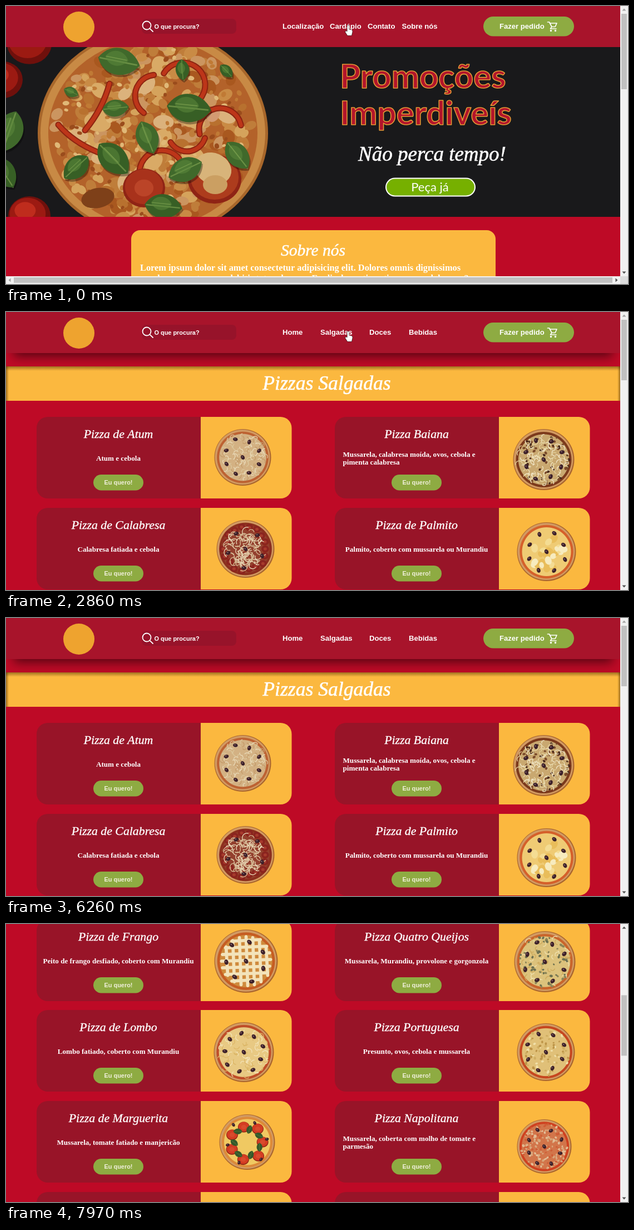
These frames come from a looping animation (1118 px wide and 501 px high, 8000 ms). An HTML page with a canvas:

```html
<!DOCTYPE html>
<html lang="pt">
<head>
<meta charset="utf-8">
<title>Pizzaria</title>
<style>
html, body { margin: 0; width: 100%; height: 100%; overflow: hidden; background: #be0a26; }
canvas { display: block; }
</style>
</head>
<body>
<canvas id="stage" width="1118" height="501"></canvas>
<script>
const ctx = document.getElementById('stage').getContext('2d');
const W = 1118, H = 501, PAGE = 1104, LOOP = 8000, TAU = Math.PI * 2;
const RED = '#be0a26', HEADER = '#a8142b', WINE = '#981428', GOLD = '#fbb83f', GREEN = '#8eab42';
const SANS = '"Liberation Sans", Arial, sans-serif';
const SERIF = '"Liberation Serif", "Times New Roman", serif';
const BODY = `bold 13.1px ${SERIF}`, NAV = `bold 13.1px ${SANS}`, SMALL = `bold 10.9px ${SANS}`;

// Basic drawing helpers
function text(str, x, y, font, color = '#fff', align = 'left') {
  ctx.font = font;
  ctx.fillStyle = color;
  ctx.textAlign = align;
  ctx.fillText(str, x, y);
}
// Centred italic lettering, slightly thickened
function script(str, x, y, size) {
  text(str, x, y, `italic ${size}px ${SERIF}`, '#fff', 'center');
  ctx.strokeStyle = '#fff';
  ctx.lineWidth = size / 60;
  ctx.strokeText(str, x, y);
}
function rect(x, y, w, h, color) {
  ctx.fillStyle = color;
  ctx.fillRect(x, y, w, h);
}
function rounded(x, y, w, h, r, color) {
  ctx.beginPath();
  ctx.roundRect(x, y, w, h, r);
  ctx.fillStyle = color;
  ctx.fill();
}
function oval(g, x, y, rx, ry, color, turn = 0) {
  g.beginPath();
  g.ellipse(x, y, rx, ry, turn, 0, TAU);
  g.fillStyle = color;
  g.fill();
}
function line(g, color, width, draw) {
  g.beginPath();
  draw(g);
  g.strokeStyle = color;
  g.lineWidth = width;
  g.lineCap = g.lineJoin = 'round';
  g.stroke();
}
function fade(x0, y0, x1, y1, from, to) {
  const f = ctx.createLinearGradient(x0, y0, x1, y1);
  f.addColorStop(0, from);
  f.addColorStop(1, to);
  return f;
}
function random(seed) {
  return () => (seed = seed * 16807 % 2147483647) / 2147483647;
}
function sheet(w, h, scale, draw) {
  const c = document.createElement('canvas');
  c.width = w * scale;
  c.height = h * scale;
  const g = c.getContext('2d');
  g.scale(scale, scale);
  draw(g);
  return c;
}

// Toppings
const bits = {
  dot: (g, x, y, s, c, a) => oval(g, x, y, s, s * .75, c, a),
  shred: (g, x, y, s, c, a) => line(g, c, 1.3, p => p.arc(x, y, s, a, a + 2.2)),
  olive(g, x, y, s, c, a) {
    oval(g, x, y, s, s * .75, c, a);
    oval(g, x - s * .2, y - s * .2, s * .3, s * .2, '#8a6a70', a);
  },
  slice(g, x, y, s, c) {
    oval(g, x, y, s, s * .92, '#8f2415');
    oval(g, x, y - s * .06, s * .9, s * .83, c);
    oval(g, x, y, s * .45, s * .4, '#e0694455');
  },
  leaf(g, x, y, s, c, a) {
    g.save();
    g.translate(x, y);
    g.rotate(a);
    g.beginPath();
    g.moveTo(-s, 0);
    g.bezierCurveTo(-s * .5, -s * .95, s * .6, -s * .75, s, 0);
    g.bezierCurveTo(s * .5, s * .85, -s * .6, s * .85, -s, 0);
    g.fillStyle = c;
    g.fill();
    line(g, '#8fb05a88', s * .07, p => { p.moveTo(-s * .9, 0); p.lineTo(s * .85, 0); });
    g.restore();
  }
};
const scatter = (kind, n, size, spread, ...cols) => (g, r, rnd) => {
  for (let i = 0; i < n; i++) {
    const a = rnd() * TAU, d = Math.sqrt(rnd()) * spread * r;
    bits[kind](g, Math.cos(a) * d, Math.sin(a) * d, size * r * (.7 + rnd() * .6),
      cols[Math.floor(rnd() * cols.length)], rnd() * TAU);
  }
};
const ring = (kind, n, size, at, color, phase = 0) => (g, r, rnd) => {
  for (let i = 0; i < n; i++) {
    const a = i / n * TAU + phase, d = at * r * (.92 + rnd() * .16);
    bits[kind](g, Math.cos(a) * d, Math.sin(a) * d, size * r, color, rnd() * TAU);
  }
};
const lattice = color => (g, r) => {
  for (let i = -3; i <= 3; i++) {
    const p = i * .21 * r, q = Math.sqrt(.6 * r * r - p * p);
    line(g, color, r * .1, c => {
      c.moveTo(-q, p); c.lineTo(q, p - 3);
      c.moveTo(p, -q); c.lineTo(p + 3, q);
    });
  }
};
const OLIVE = '#3c2029', CHOCO = '#4c281c';
const olives = n => (g, r, rnd) => {
  ring('olive', n, .085, .64, OLIVE, .4)(g, r, rnd);
  bits.olive(g, 0, 0, r * .085, OLIVE, 1);
};
const swirls = scatter('shred', 45, .13, .78, '#6d3f2c', '#5c3224', '#3b1d14');

let seed = 11;
function pizza(dx, dy, r, sauce, base, ...tops) {
  const rnd = random(seed += 97);
  const img = sheet(2 * r + 4, 2 * r + 4, 2, g => {
    g.translate(r + 2, r + 2);
    oval(g, 0, 0, r, r, '#a9662f');
    oval(g, -.5, -.5, r * .97, r * .97, '#d29a62');
    oval(g, 0, 0, r * .91, r * .91, sauce);
    oval(g, 0, 0, r * .83, r * .83, base);
    tops.forEach(top => top(g, r, rnd));
  });
  return { dx, dy, r, img };
}
const cheese = (n, ...cols) => scatter('shred', n, .09, .82, ...cols);
const specks = (n, ...cols) => scatter('dot', n, .045, .84, ...cols);
const choco = (dx, dy, r, ...tops) => pizza(dx, dy, r, CHOCO, CHOCO, ...tops);
const item = (name, desc, pic) => ({ name: 'Pizza ' + name, desc: desc.split('|'), pic });

const salty = [
  [item('de Atum', 'Atum e cebola',
    pizza(76, 73, 51, '#bd6232', '#d3b183', cheese(110, '#e9dab8', '#dcc79c', '#c39a69'), olives(8))),
   item('Baiana', 'Mussarela, calabresa moída, ovos, cebola e|pimenta calabresa',
    pizza(81, 77, 55, '#7c3a1c', '#c9a870', specks(60, '#4a2a1c', '#7a4a2a'), cheese(110, '#f1e6c6', '#e4d3a0'), olives(8)))],
  [item('de Calabresa', 'Calabresa fatiada e cebola',
    pizza(81, 74, 52, '#8c2f1e', '#93402e', ring('slice', 18, .13, .74, '#8a2420'),
      scatter('shred', 110, .13, .64, '#e9d9b8', '#d8bd97'), olives(5))),
   item('de Palmito', 'Palmito, coberto com mussarela ou Murandiu',
    pizza(86, 79, 53, '#d5602a', '#efcb74', scatter('dot', 26, .13, .65, '#f7ebbe', '#f4dc93', '#e9bd5a'), olives(8)))],
  [item('de Frango', 'Peito de frango desfiado, coberto com Murandiu',
    pizza(82, 75, 57, '#c65d22', '#cf8a3c', lattice('#f3e3ba'), olives(7))),
   item('Quatro Queijos', 'Mussarela, Murandiu, provolone e gorgonzola',
    pizza(83, 76, 55, '#c9652b', '#dcc27c', cheese(60, '#f0e2b0', '#cda85a'), specks(60, '#6c7050', '#8b8558'), olives(8)))],
  [item('de Lombo', 'Lombo fatiado, coberto com Murandiu',
    pizza(78, 76, 54, '#bf4d28', '#e8c983', cheese(80, '#f3e3b6', '#dcb666'), olives(9))),
   item('Portuguesa', 'Presunto, ovos, cebola e mussarela',
    pizza(85, 76, 52, '#c6471f', '#e0c078', specks(90, '#f0dfa8', '#bd9448', '#cfae62'), olives(8)))],
  [item('de Marguerita', 'Mussarela, tomate fatiado e manjericão',
    pizza(84, 74, 50, '#dd8a38', '#f0c962', ring('slice', 7, .21, .6, '#d43c22'), ring('leaf', 7, .16, .5, '#35592a', .4),
      ring('olive', 6, .07, .77, OLIVE, .9))),
   item('Napolitana', 'Mussarela, coberta com molho de tomate e|parmesão',
    pizza(82, 82, 49, '#cf401f', '#d2754a', specks(170, '#e3bd96', '#d9a67a', '#cf5d35'), olives(8)))],
  [item('de Pepperoni', 'Mussarela, coberta com pepperoni fatiado',
    pizza(85, 72, 50, '#c25a2c', '#d98344', ring('slice', 15, .14, .74, '#b9291c'), ring('slice', 10, .14, .47, '#c4301f'),
      ring('slice', 5, .14, .2, '#b9291c'))),
   item('de Brócolis', 'Brócolis com Murandiu',
    pizza(82, 79, 50, '#c99a50', '#d3c286', specks(65, '#6c8a3c', '#557231'), lattice('#eee3c0'), specks(35, '#6c8a3c'), olives(7)))]
];
const sweet = [
  [item('de Bruvela', 'Atum e cebola', choco(83, 77, 50, swirls)),
   item('de Morango e Bruvela', 'Peito de frango desfiado, coberto com Murandiu',
    choco(82, 76, 45, swirls, ring('leaf', 8, .13, .64, '#c9242c'), ring('leaf', 3, .12, .13, '#e56a5c')))],
  [item('de KV e Bruvela', 'Calabresa fatiada e cebola',
    choco(83, 75, 50, swirls, scatter('dot', 140, .042, .84, '#e2331f', '#f4c21c', '#2f8fd0', '#45a83a', '#ef7d1c'))),
   item('de Brigadeiro', 'Lombo fatiado, coberto com Murandiu',
    choco(82, 76, 49, scatter('dot', 420, .025, .88, '#2e170f', '#64402c', '#3b2016')))]
];

// Home banner
const TOP = 74;
const LEAVES = [
  [203, 100, 38, .2], [317, 115, 19, 1.5], [197, 184, 24, -.1], [329, 184, 40, .1],
  [254, 237, 31, 1.2], [193, 275, 37, .8], [416, 269, 30, .9], [126, 291, 29, 2.4],
  [322, 295, 33, 2.7], [283, 361, 34, .1], [117, 155, 14, .4], [396, 117, 15, .8], [6, 226, 38, 1.9], [-4, 300, 32, 1]
];
function tomato(g, x, y, r) {
  oval(g, x, y, r, r * .92, '#6f100c');
  oval(g, x - r * .08, y - r * .1, r * .85, r * .75, '#9c1a12');
  oval(g, x - r * .2, y - r * .25, r * .5, r * .4, '#bf2c1d');
}
function pepper(g, draw) {
  line(g, '#8c2411', 11, draw);
  line(g, '#bd3519', 7, draw);
}
const banner = sheet(PAGE, 306, 1, g => {
  g.translate(0, -TOP);
  g.fillStyle = '#19191b';
  g.fillRect(0, TOP, PAGE, 306);
  tomato(g, 42, 68, 40);
  tomato(g, -6, 133, 36);
  tomato(g, 42, 378, 38);
  oval(g, 264, 229, 207, 188, '#a8672b');
  oval(g, 264, 229, 202, 183, '#c88a45');
  oval(g, 264, 229, 188, 170, '#b3622a');
  g.save();
  g.translate(264, 229);
  g.scale(1, .91);
  const rnd = random(2024);
  scatter('dot', 330, .06, .93, '#c98b45', '#b8712f', '#d5a35c', '#a9581f', '#cb9560', '#bf7d3a')(g, 190, rnd);
  scatter('dot', 22, .1, .75, '#dbb27c', '#d39a72', '#d9aa66')(g, 190, rnd);
  scatter('dot', 160, .025, .92, '#e0b877', '#9a4c1c', '#c07a35')(g, 190, rnd);
  g.restore();
  pepper(g, p => p.arc(318, 142, 40, -2.6, .8));
  pepper(g, p => p.arc(270, 162, 38, 2.2, 4.6));
  pepper(g, p => p.arc(385, 222, 38, 2.9, 6.1));
  pepper(g, p => p.arc(325, 228, 34, .3, 2.6));
  pepper(g, p => p.arc(280, 300, 40, 3, 5.6));
  pepper(g, p => { p.moveTo(186, 140); p.quadraticCurveTo(174, 185, 142, 224); });
  pepper(g, p => { p.moveTo(94, 214); p.quadraticCurveTo(120, 245, 166, 264); });
  bits.slice(g, 248, 328, 38, '#a8321b');
  bits.slice(g, 375, 312, 48, '#ad3c1d');
  oval(g, 372, 293, 34, 28, '#d8b47a', .4);
  oval(g, 376, 322, 22, 17, '#cb9f62');
  oval(g, 165, 346, 30, 18, '#7e4019', -.2);
  LEAVES.forEach(([x, y, s, a], i) => {
    bits.leaf(g, x + 2, y + 4, s, '#00000055', a);
    bits.leaf(g, x, y, s, i % 2 ? '#375f25' : '#40692b', a);
    bits.leaf(g, x - s * .1, y - s * .15, s * .55, '#5d8a3c88', a);
  });
});

// Page parts
function header(links) {
  ctx.save();
  ctx.shadowColor = 'rgba(0,0,0,.55)';
  ctx.shadowBlur = 18;
  ctx.shadowOffsetY = 10;
  rect(14, 0, PAGE - 28, 70, HEADER);
  ctx.restore();
  rect(0, 0, PAGE, TOP, HEADER);
  oval(ctx, 131, 38, 28, 28, '#eea32f');
  rounded(244, 23, 170, 27, 8, '#97132a');
  line(ctx, '#fff', 1.8, p => {
    p.arc(253, 35, 7.5, .8, .8 + TAU);
    p.lineTo(264, 46);
  });
  text('O que procura?', 266.5, 41, SMALL);
  links.forEach(([label, x]) => text(label, x, 41, NAV));
  rounded(858, 19, 163, 35.5, 18, GREEN);
  text('Fazer pedido', 887, 41, NAV);
  line(ctx, '#fff', 1.7, p => {
    p.moveTo(973.5, 29); p.lineTo(976.5, 29); p.lineTo(981, 37.5); p.lineTo(987, 37.5); p.lineTo(990, 31); p.lineTo(978, 31);
    p.moveTo(981, 37.5); p.lineTo(978.5, 41); p.lineTo(989, 41);
  });
  oval(ctx, 979.5, 44.5, 1.7, 1.7, '#fff');
  oval(ctx, 987.5, 44.5, 1.7, 1.7, '#fff');
}

function band(label, center, y) {
  rect(0, y, PAGE, 62, GOLD);
  const dark = 'rgba(70,40,0,.5)', clear = 'rgba(70,40,0,0)';
  rect(0, y, PAGE, 8, fade(0, y, 0, y + 8, dark, clear));
  rect(0, y, 5, 62, fade(0, 0, 5, 0, dark, clear));
  rect(PAGE - 5, y, 5, 62, fade(PAGE, 0, PAGE - 5, 0, dark, clear));
  script(label, center, y + 42, 35.6);
}

function card({ name, desc, pic }, x, top) {
  if (top > H || top < -150) return;
  const y = Math.round(top), h = Math.round(top + 147.3) - y;
  rounded(x, y, 295, h, [20, 0, 0, 20], WINE);
  rounded(x + 295, y, 163.5, h, [0, 20, 20, 0], GOLD);
  const mid = x + 147;
  script(name, mid, y + 38, 21.8);
  if (desc.length > 1) desc.forEach((row, i) => text(row, x + 14.5, y + 71.5 + i * 14.6, BODY));
  else text(desc[0], mid, y + 79, BODY, '#fff', 'center');
  rounded(mid - 45, y + 104, 90, 28.5, 14.25, GREEN);
  text('Eu quero!', mid, y + 122, SMALL, '#f1f0dc', 'center');
  const { dx, dy, r, img } = pic;
  ctx.drawImage(img, x + 294.5 + dx - r - 2, y + dy - r - 2, 2 * r + 4, 2 * r + 4);
}

function arrow(x, y, dx, dy, color) {
  ctx.beginPath();
  ctx.moveTo(x + dx * 2.5, y + dy * 2.5);
  ctx.lineTo(x - dx * 1.5 + dy * 3.5, y - dy * 1.5 + dx * 3.5);
  ctx.lineTo(x - dx * 1.5 - dy * 3.5, y - dy * 1.5 - dx * 3.5);
  ctx.fillStyle = color;
  ctx.fill();
}
function scrollbar(bottom, top, size) {
  rect(PAGE, 0, 14, bottom, '#f1f1f1');
  rect(PAGE + 2, top, 10, size, '#c1c1c1');
  arrow(1111, 7, 0, -1, top > 14 ? '#505050' : '#a3a3a3');
  arrow(1111, bottom - 7, 0, 1, '#505050');
}

function home() {
  rect(0, 0, W, H, RED);
  header([['Localização', 497], ['Cardápio', 582], ['Contato', 650], ['Sobre nós', 711.5]]);
  ctx.drawImage(banner, 0, TOP);
  const big = 'bold 60px Lato, sans-serif';
  [['Promoções', 148], ['Imperdiveís', 214]].forEach(([str, y]) => {
    text(str, 600, y, big, '#b3152b');
    ctx.strokeStyle = '#e39a35';
    ctx.lineWidth = 1.6;
    ctx.strokeText(str, 600, y);
  });
  script('Não perca tempo!', 766, 279, 37);
  rounded(682, 309.5, 162, 34, 17, '#fff');
  rounded(684, 311.5, 158, 30, 15, '#76b000');
  text('Peça já', 762, 334, '22px Lato, sans-serif', '#fff', 'center');
  rounded(225, 404, 655, 120, 16, GOLD);
  script('Sobre nós', 552, 450, 29.5);
  const copy = `bold 16.37px ${SERIF}`;
  text('Lorem ipsum dolor sit amet consectetur adipisicing elit. Dolores omnis dignissimos', 241, 477, copy);
  text('quod eaque aut nemo, debitis totam harum. Explicabo optio ratione, saepe laborum?', 241, 496, copy);
  scrollbar(487, 14, 136);
  rect(0, 487, PAGE, 14, '#f1f1f1');
  rect(14, 489, 1076, 10, '#c1c1c1');
  rect(PAGE, 487, 14, 14, '#dcdcdc');
  arrow(7, 494, -1, 0, '#a3a3a3');
  arrow(1097, 494, 1, 0, '#505050');
}

const ROW = 163.7, SWEET_TOP = 1179.5;
function menu(scroll, wide) {
  rect(0, 0, W, H, RED);
  const at = y => Math.round(y - scroll);
  const rows = (list, top) => list.forEach(([left, right], i) => {
    const y = top + i * ROW - scroll;
    card(left, wide ? 55 : 323, y);
    if (wide) card(right, 591, y);
  });
  if (scroll < 110) {
    ctx.save();
    ctx.translate(0, at(0));
    header([['Home', 497], ['Salgadas', 565], ['Doces', 653], ['Bebidas', 724]]);
    ctx.restore();
  }
  band('Pizzas Salgadas', 576.5, at(98));
  rows(salty, 189);
  if (wide) {
    band('Pizzas Doces', 559.5, at(SWEET_TOP));
    rows(sweet, SWEET_TOP + 91);
    band('Bebidas', 548.5, at(SWEET_TOP + 427));
  }
  scrollbar(H, 14 + scroll / 4.59, wide ? 109 : 114);
}

// Pointer, placed by its hot spot
function pointer(kind, x, y) {
  const hand = 'M-1.5 1Q0-1 1.5 1V7L5 8Q8 8 7.5 12L6 18H-1L-5 12Q-5 9-1.5 11Z';
  const tip = 'M0 0V13L3 10.2L5 14.8L7 14L5 9.5H9Z';
  const shape = new Path2D(kind === 'hand' ? hand : tip);
  ctx.save();
  ctx.translate(x, y);
  ctx.lineWidth = 1.2;
  ctx.strokeStyle = '#222';
  ctx.stroke(shape);
  ctx.fillStyle = '#fff';
  ctx.fill(shape);
  ctx.restore();
}

// Timeline: each entry holds until the next one
const scrolls = [
  [0, 0], [4460, 98], [5290, 16.4], [5360, 0], [6500, SWEET_TOP],
  [7500, 1115], [7580, 925], [7660, 852.3], [7900, 630], [7970, 524.9]
];
const pointers = [
  [0, 'hand', 615, 35], [3730], [4300, 'hand', 607, 40], [4950, 'arrow', 608, 40],
  [5550, 'arrow', 616, 43], [5628, 'arrow', 633, 48], [5706, 'arrow', 655, 51],
  [5784, 'arrow', 676, 51], [5862, 'arrow', 687, 43], [5940, 'hand', 682, 34],
  [6260], [6500, 'arrow', 680, 34], [6940, 'arrow', 679, 50], [7010]
];
const held = (list, t) => list.filter(k => k[0] <= t).pop();

function frame(now) {
  const t = now % LOOP;
  if (t < 2260) home();
  else menu(held(scrolls, t)[1], t >= 2860);
  const [, kind, x, y] = held(pointers, t);
  if (kind) pointer(kind, x, y);
}
const start = performance.now();
function tick() {
  frame(performance.now() - start);
  requestAnimationFrame(tick);
}
tick();
</script>
</body>
</html>
```
